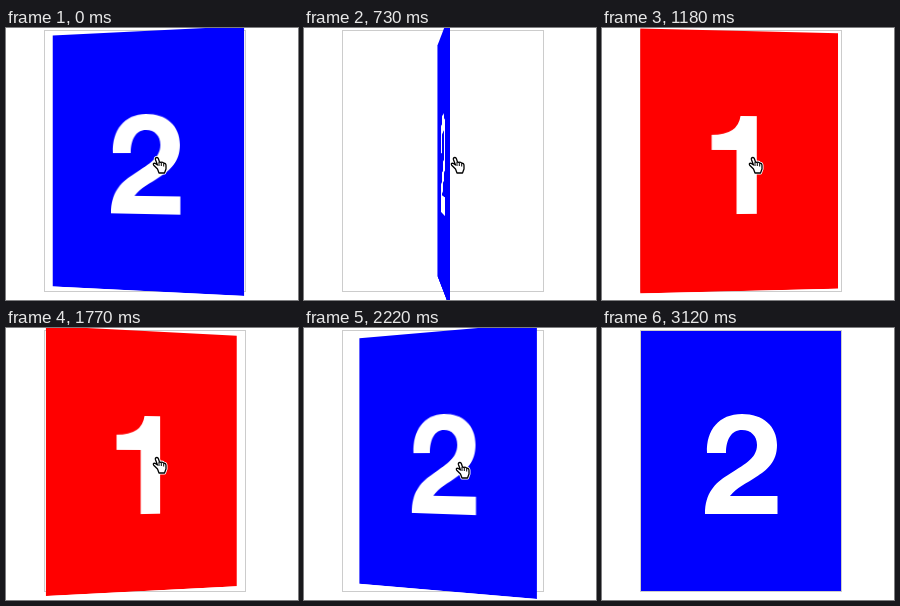
An HTML page that plays this animation: 292x272 px, repeating every 3.46 s.

```html
<!DOCTYPE html>
<html lang="en">
<head>
<meta charset="utf-8">
<title>Card flip</title>
<style>
  html, body {
    margin: 0;
    width: 100%;
    height: 100%;
    overflow: hidden;
    background: #fff;
  }
  .scene {
    position: absolute;
    left: 38px;
    top: 2px;
    width: 200px;
    height: 260px;
    border: 1px solid #ccc;
    perspective: 800px;
  }
  .card {
    width: 100%;
    height: 100%;
    transform-style: preserve-3d;
  }
  .face {
    position: absolute;
    width: 200px;
    height: 260px;
    fill: #fff;
    backface-visibility: hidden;
  }
  .front { background: #f00; }
  .back { background: #00f; transform: rotateY(180deg); }
  .pointer {
    position: absolute;
    left: 0;
    top: 0;
    stroke-linejoin: round;
  }
</style>
</head>
<body>
<div class="scene">
  <div class="card" id="card">
    <svg class="face front" viewBox="39 3 200 260" role="img" aria-label="1">
      <path d="M155 186H134.5V122H109.5V107Q136 107 138.5 88H155Z"/>
    </svg>
    <svg class="face back" viewBox="39 3 200 260" role="img" aria-label="2">
      <path d="M105 125C104 102 117 86 140 86C161 86 175 98 175 117C175 134 165 142 154 149C145 155 134 160 128 168H175.5V186H103C103 165 113 155 126 147C141 137 155 131 155 117C155 108 149 102 140 102C129 102 124 112 124 125Z"/>
    </svg>
  </div>
</div>
<svg class="pointer" id="pointer" width="16" height="19">
  <defs>
    <path id="hand" d="M5 1.5Q2.8 1.5 3.5 3.8L5.5 9L3 7.3Q.5 7 1.7 9.2L5.5 13L7 17H12.5L14 13V9.5Q14 7 11.8 7.3Q11 5.7 8.8 6.3L7.5 6L6.4 2.7Q6 1.5 5 1.5Z"/>
  </defs>
  <use href="#hand" fill="#fff" stroke="#fff" stroke-width="3"/>
  <use href="#hand" fill="#fff" stroke="#000" stroke-width="1.3"/>
  <path d="M7 6V10M9.3 6.5V10M11.7 7.5V10.5" fill="none" stroke="#000"/>
</svg>
<script>
  const LOOP = 3460;
  const FLIP = 1000;
  const STEP = 148.5; // the picture is held for one step at a time
  const card = document.getElementById('card');
  const pointer = document.getElementById('pointer');

  const clamp = x => Math.min(1, Math.max(0, x));

  const bezier = (a, b, s) =>
    3 * a * s * (1 - s) ** 2 + 3 * b * s * s * (1 - s) + s ** 3;

  // CSS "ease": cubic-bezier(.25, .1, .25, 1)
  function ease(x) {
    let low = 0, high = 1;
    for (let i = 0; i < 30; i++) {
      const mid = (low + high) / 2;
      if (bezier(0.25, 0.25, mid) < x) low = mid;
      else high = mid;
    }
    return bezier(0.1, 1, low);
  }

  const flip = (t, start) => 180 * ease(clamp((t - start) / FLIP));

  // The loop opens in the middle of a flip to the back.
  const cardAngle = t => flip(t, -642) - flip(t, 449) + flip(t, 1670);

  // The pointer rests, drifts off slowly, then leaves through the bottom edge.
  function pointerAt(t) {
    const drift = 30 * clamp((t - 1920) / 750) ** 2;
    const exit = Math.max(0, (t - 2670) / 300);
    return [146 + drift + 68 * exit, 128 + drift + 97 * exit].map(Math.round);
  }

  function draw(now) {
    const time = now % LOOP;
    const t = Math.floor((time + 13) / STEP) * STEP - 10;
    const [x, y] = pointerAt(t);
    card.style.transform = `rotateY(${cardAngle(t)}deg)`;
    pointer.style.transform = `translate(${x}px, ${y}px)`;
  }

  const start = performance.now();
  function loop() {
    draw(performance.now() - start);
    requestAnimationFrame(loop);
  }
  loop();
</script>
</body>
</html>
```
